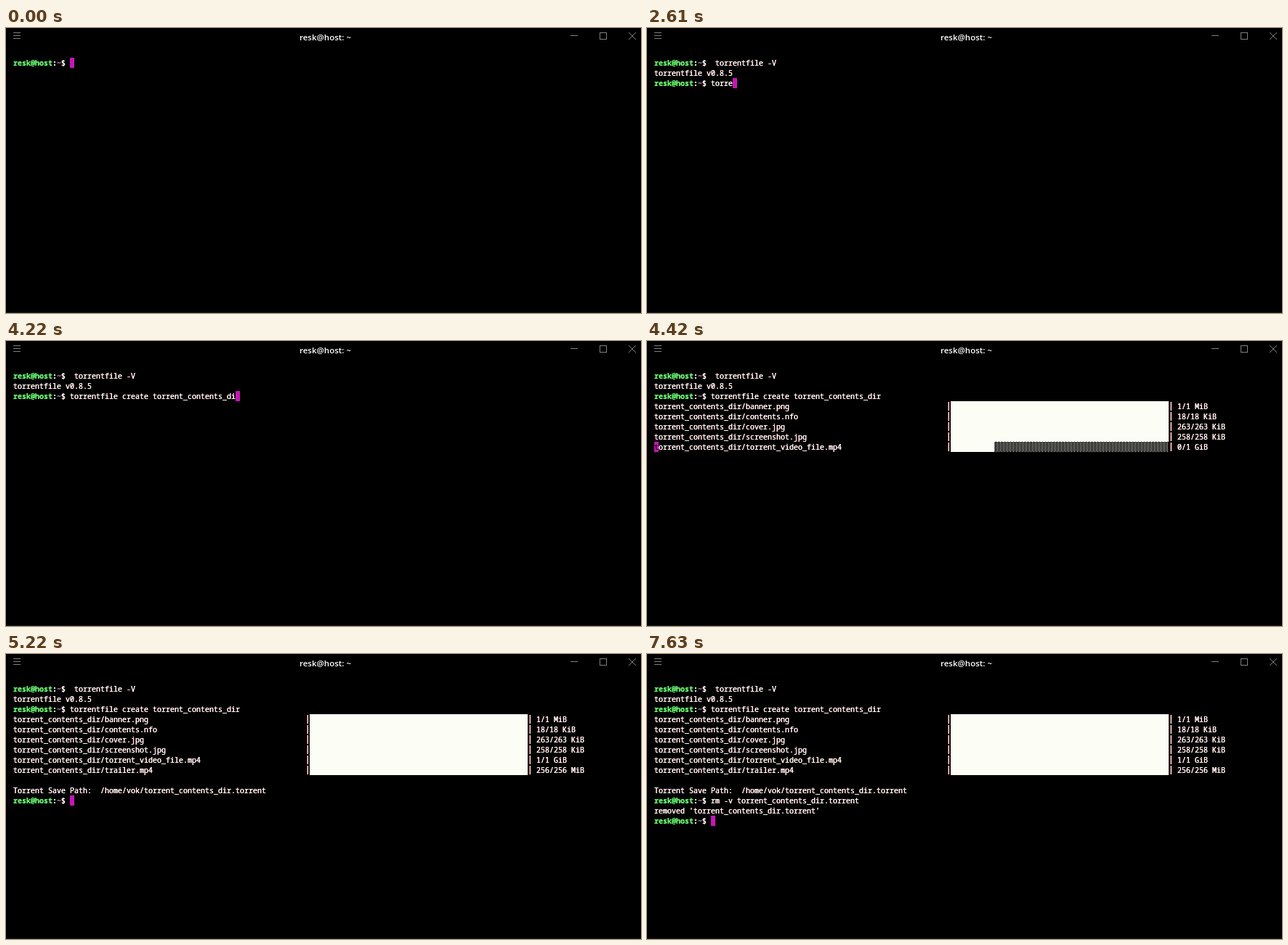
Write an HTML page with a canvas that moves like this. It is 874 by 393 pixels and loops after 8000 ms.

```html
<!DOCTYPE html>
<html lang="en">
<head>
<meta charset="utf-8">
<title>Terminal</title>
<style>
  html, body { margin: 0; width: 100%; height: 100%; overflow: hidden; background: #000; }
  canvas { display: block; }
</style>
</head>
<body>
<canvas id="stage" width="874" height="393"></canvas>
<script>
const ctx = document.getElementById('stage').getContext('2d', { alpha: false });

const LOOP = 8000;
const CELL_W = 6, CELL_H = 14, LEFT = 10, TOP = 41;
const PROMPT_COLS = 13, BAR_COL = 68, BAR_COLS = 50, LABEL_COL = 120;
const MONO = '"Noto Sans Mono", "DejaVu Sans Mono", monospace';
const LOGIN = 'resk@host';
const DIR = 'torrent_contents_dir';
const WHITE = '#fff', GREEN = '#67f86f', DIM = '#9090a8', GRAY = '#808080';
const MAGENTA = '#c616b7', FILL = '#fcfdf5', FRINGE = '#b03a30';

const VERSION = ' torrentfile -V';
const CREATE = 'torrentfile create ' + DIR;
const REMOVE = 'rm -v ' + DIR + '.torrent';

// [time, characters typed]
const VERSION_KEYS = [[0, 0], [810, 4], [1010, 8], [1210, 13]];
const CREATE_KEYS = [[1410, 0], [2410, 2], [2610, 5], [2810, 10], [3010, 14], [3210, 18],
  [3420, 22], [3620, 26], [3820, 30], [4020, 34], [4220, 38]];
const REMOVE_KEYS = [[5220, 0], [7430, REMOVE.length]];

// [time, filled cells]
const VIDEO_FILL = [[4420, 10], [4620, 25], [4820, 39], [5020, 50]];
const TRAILER_FILL = [[5020, 17], [5220, 50]];

const DONE = { version: 1410, list: 4420, trailer: 5020, create: 5220, remove: 7630 };

const FILES = [
  ['banner.png', '1/1 MiB'],
  ['contents.nfo', '18/18 KiB'],
  ['cover.jpg', '263/263 KiB'],
  ['screenshot.jpg', '258/258 KiB']
];

const shade = makeShade();

function makeShade() {
  const tile = document.createElement('canvas');
  tile.width = 4;
  tile.height = 2;
  const c = tile.getContext('2d');
  c.fillStyle = FILL;
  c.fillRect(0, 0, 1, 1);
  c.fillRect(2, 1, 1, 1);
  return ctx.createPattern(tile, 'repeat');
}

function stepAt(steps, t) {
  let value = steps[0][1];
  for (const [time, v] of steps) if (t >= time) value = v;
  return value;
}

const colX = col => LEFT + col * CELL_W;
const rowY = row => TOP + row * CELL_H;

function rect(x, y, w, h, color) {
  ctx.fillStyle = color;
  ctx.fillRect(x, y, w, h);
}

function text(str, col, row, color = WHITE, weight = 500) {
  const x = colX(col), y = rowY(row) + 11;
  ctx.font = `${weight} 10px ${MONO}`;
  ctx.textAlign = 'left';
  // white glyphs carry a warm left edge, as on a subpixel display
  if (color === WHITE) {
    ctx.fillStyle = FRINGE;
    ctx.fillText(str, x - 0.5, y);
  }
  ctx.fillStyle = color;
  ctx.fillText(str, x, y);
  ctx.fillText(str, x, y);
}

function cursor(col, row, under = '') {
  rect(colX(col), rowY(row), CELL_W, CELL_H, MAGENTA);
  if (under) text(under, col, row, '#000');
}

function prompt(row) {
  text(LOGIN, 0, row, GREEN, 700);
  text(':', 9, row, WHITE, 700);
  text('~', 10, row, DIM, 700);
  text('$', 11, row);
}

function command(row, str, keys, doneAt, t) {
  prompt(row);
  const typing = t < doneAt;
  const count = typing ? stepAt(keys, t) : str.length;
  text(str.slice(0, count), PROMPT_COLS, row);
  if (typing) cursor(PROMPT_COLS + count, row);
}

function pipe(col, row) {
  const x = colX(col), y = rowY(row) + 1;
  rect(x + 2, y, 1, 12, FRINGE);
  rect(x + 3, y, 1, 12, WHITE);
}

function fileRow(row, name, label, filled = BAR_COLS) {
  const y = rowY(row), mid = colX(BAR_COL + filled);
  text(DIR + '/' + name, 0, row);
  pipe(BAR_COL - 1, row);
  rect(colX(BAR_COL), y, filled * CELL_W, CELL_H, FILL);
  rect(mid, y, (BAR_COLS - filled) * CELL_W, CELL_H, shade);
  pipe(BAR_COL + BAR_COLS, row);
  text(label, LABEL_COL, row);
}

function fileList(t) {
  FILES.forEach(([name, label], i) => fileRow(3 + i, name, label));

  const videoDone = t >= DONE.trailer;
  fileRow(7, 'torrent_video_file.mp4', videoDone ? '1/1 GiB' : '0/1 GiB', stepAt(VIDEO_FILL, t));
  if (!videoDone) return cursor(0, 7, 't');

  const allDone = t >= DONE.create;
  fileRow(8, 'trailer.mp4', allDone ? '256/256 MiB' : '88/256 MiB', stepAt(TRAILER_FILL, t));
  if (!allDone) cursor(0, 8, 't');
}

function titleBar() {
  ctx.font = '600 11.5px "Open Sans", "Noto Sans", sans-serif';
  ctx.textAlign = 'center';
  ctx.fillStyle = WHITE;
  ctx.fillText(LOGIN + ': ~', 439.5, 17);

  for (const y of [6, 10, 14]) rect(10, y, 10, 1, GRAY);
  rect(777, 10, 10, 1, GRAY);
  ctx.strokeStyle = GRAY;
  ctx.lineWidth = 1;
  ctx.strokeRect(817.5, 6.5, 9, 9);
  ctx.beginPath();
  ctx.moveTo(857, 6);
  ctx.lineTo(867, 16);
  ctx.moveTo(867, 6);
  ctx.lineTo(857, 16);
  ctx.stroke();
}

function draw(t) {
  rect(0, 0, 874, 393, '#000');
  rect(0, 392, 874, 1, '#1c1c1c');
  titleBar();

  command(0, VERSION, VERSION_KEYS, DONE.version, t);
  if (t < DONE.version) return;
  text('torrentfile v0.8.5', 0, 1);

  command(2, CREATE, CREATE_KEYS, DONE.list, t);
  if (t < DONE.list) return;
  fileList(t);
  if (t < DONE.create) return;
  text('Torrent Save Path:  /home/vok/' + DIR + '.torrent', 0, 10);

  command(11, REMOVE, REMOVE_KEYS, DONE.remove, t);
  if (t < DONE.remove) return;
  text(`removed '${DIR}.torrent'`, 0, 12);
  prompt(13);
  cursor(PROMPT_COLS, 13);
}

const start = performance.now();

function tick() {
  draw((performance.now() - start) % LOOP);
  requestAnimationFrame(tick);
}

tick();
</script>
</body>
</html>
```
